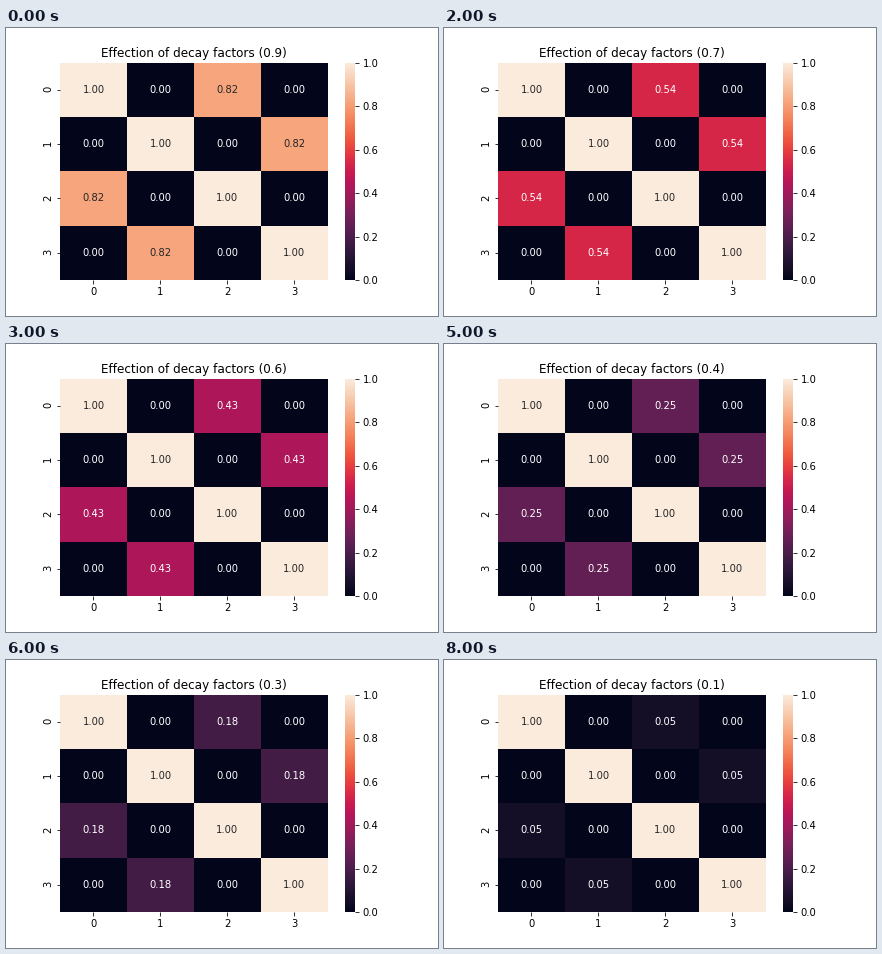
These frames come from a looping animation (432x288 px, 9 s). A matplotlib script:

```python
import matplotlib.pyplot as plt
import numpy as np
from matplotlib.animation import FuncAnimation
from matplotlib.colors import LinearSegmentedColormap

plt.rcParams["font.family"] = "DejaVu Sans"

SIZE = 4
STEPS = 9

# Dark-to-cream colour ramp: position -> colour
RAMP = {
    0: "#03051a", 1 / 19: "#150e26", 1 / 11: "#221331", 1 / 7: "#35193e",
    2 / 11: "#451c47", 1 / 5: "#4c1d4b", 1 / 4: "#611f53", 2 / 7: "#701f57",
    1 / 3: "#841e5a", 4 / 11: "#921c5b", 2 / 5: "#a11a5b", 3 / 7: "#ad1759",
    5 / 11: "#b91657", 1 / 2: "#cb1b4f", 6 / 11: "#d92847", 4 / 7: "#e13342",
    3 / 5: "#e83f3f", 7 / 11: "#ed513e", 2 / 3: "#f06043", 5 / 7: "#f37651",
    3 / 4: "#f4875e", 4 / 5: "#f69c73", 9 / 11: "#f6a47b", 6 / 7: "#f6b48f",
    10 / 11: "#f7c9aa", 1: "#faebdd",
}
cmap = LinearSegmentedColormap.from_list("ramp", list(RAMP.items()))


def similarity(decay):
    """Matrix linking items two apart; the link weakens with the decay."""
    link = decay / (2 - decay)
    return np.eye(SIZE) + link * (np.eye(SIZE, k=2) + np.eye(SIZE, k=-2))


fig, ax = plt.subplots(figsize=(6, 4), dpi=72)
fig.subplots_adjust(left=0.125, right=0.9, bottom=0.125, top=0.88)

mesh = ax.pcolormesh(similarity(0.9), cmap=cmap, vmin=0, vmax=1)
ax.set(xlim=(0, SIZE), ylim=(SIZE, 0))
ax.spines[:].set_visible(False)
centres = np.arange(SIZE) + 0.5
ax.set_xticks(centres, range(SIZE))
ax.set_yticks(centres, range(SIZE), rotation="vertical")

bar = fig.colorbar(mesh, ax=ax)
bar.outline.set_linewidth(0)

title = ax.set_title("")
labels = [ax.text(x, y, "", ha="center", va="center")
          for y in centres for x in centres]


def update(step):
    decay = (STEPS - step) / 10
    values = similarity(decay)
    mesh.set_array(values)
    title.set_text(f"Effection of decay factors ({decay:.1f})")
    for label, value in zip(labels, values.flat):
        label.set_text(f"{value:.2f}")
        label.set_color("0.15" if value > 0.77 else "white")
    return [mesh, title, *labels]


anim = FuncAnimation(fig, update, frames=STEPS, interval=1000,
                     repeat=True, repeat_delay=0)
plt.show()
```
